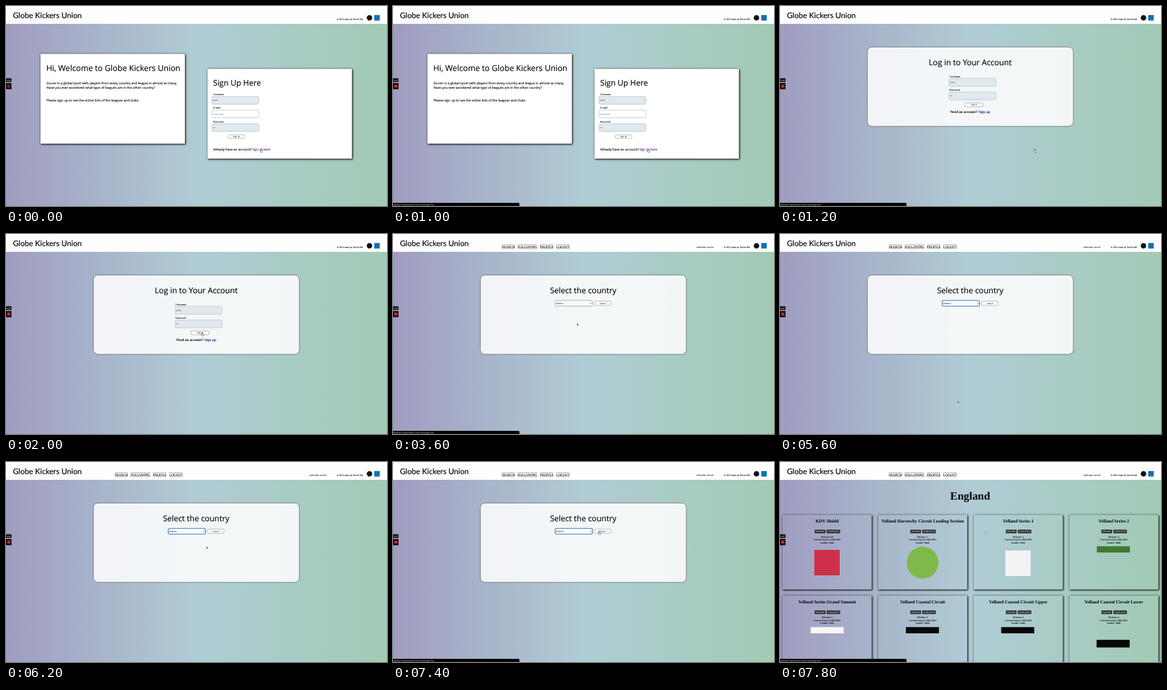
An HTML page for the animation above (8000 ms loop, 600 by 314 pixels).

```html
<!DOCTYPE html>
<html lang="en">
<head>
<meta charset="utf-8">
<title>Globe Kickers Union</title>
<style>
  html, body { margin: 0; width: 100%; height: 100%; overflow: hidden; background: #b0ccd5; }
  svg { display: block; width: 100vw; height: 100vh; }
  text { text-rendering: geometricPrecision; white-space: pre; fill: #000; }
  .head { font-family: "Open Sans", "Noto Sans", sans-serif; stroke: currentColor; stroke-width: .12px; }
  .logo { font-family: Lato, sans-serif; stroke: #000; stroke-width: .15px; }
  .hand { font-family: Lato, sans-serif; font-style: italic; }
  .serif { font-family: "Liberation Serif", serif; stroke: #000; stroke-width: .08px; }
  .bold { font-family: "Liberation Serif", serif; font-weight: 700; }
  .ui { font-family: "Liberation Sans", sans-serif; }
  .shadow { filter: drop-shadow(1.2px 1.4px 1.2px rgba(0, 0, 0, .85)) drop-shadow(.6px .8px 1.8px rgba(0, 0, 0, .5)); }
</style>
</head>
<body>
<svg id="stage" viewBox="0 0 600 314">
  <defs>
    <linearGradient id="bg" gradientUnits="userSpaceOnUse" x1="0" y1="0" x2="600" y2="0">
      <stop offset="0" stop-color="#a09dc0"/>
      <stop offset=".5" stop-color="#b0ccd5"/>
      <stop offset="1" stop-color="#a1cab4"/>
    </linearGradient>
  </defs>
</svg>
<script>
const LOOP = 8000, STEP = 200, ROW = 5.162;
const stage = document.getElementById("stage");

function add(parent, tag, attrs = {}) {
  const node = document.createElementNS("http://www.w3.org/2000/svg", tag);
  for (const key in attrs) node.setAttribute(key, attrs[key]);
  parent.append(node);
  return node;
}
const group = (parent = stage) => add(parent, "g");
const rect = (g, x, y, width, height, fill, more) =>
  add(g, "rect", { x, y, width, height, fill, ...more });
const disc = (g, cx, cy, r, fill) => add(g, "circle", { cx, cy, r, fill });
function label(g, kind, size, x, y, words, color, anchor = "start") {
  const node = add(g, "text", { class: kind, "font-size": size, x, y, "text-anchor": anchor });
  if (color) node.style.fill = node.style.color = color;
  node.textContent = words;
  return node;
}
const show = (g, on) => g.setAttribute("display", on ? "inline" : "none");

function field(g, x, y, words, filled = true) {
  rect(g, x, y, 74, 12.2, filled ? "#e1e9ee" : "#fff", { rx: 2.6, stroke: "#9db2be", "stroke-width": .6 });
  label(g, "ui", 3.1, x + 2, y + 7.2, words, filled ? "#111" : "#666");
}
function button(g, x, y, w, h, words) {
  rect(g, x, y, w, h, "#fdfdfd", { rx: 1.6, stroke: "#8a8f92", "stroke-width": .6 });
  label(g, "ui", 3.1, x + w / 2, y + h / 2 + 1.1, words, "#000", "middle");
}
const panel = g => rect(g, 137.5, 64.3, 324.5, 124.7, "rgba(255,255,255,.85)",
  { rx: 7.5, stroke: "#747b80", "stroke-width": 1 });

// Page background and header
rect(stage, 0, 0, 600, 314, "url(#bg)");
rect(stage, 0, 0, 600, 28, "#fefeff");
label(stage, "logo", 12.1, 11, 19.4, "Globe Kickers Union");
label(stage, "serif", 3.65, 521, 22.2, "© 2021 made by Torvin Pell");
disc(stage, 572.4, 18.5, 4.3, "#111");
rect(stage, 580, 14.2, 8.6, 8.6, "#0a72b3");

const nav = group();
[["SEARCH", 171.3, 20.7], ["FOLLOWING", 196.2, 31], ["PROFILE", 231.5, 21], ["LOGOUT", 257, 21.3]]
  .forEach(([words, x, w]) => {
    label(nav, "serif", 5.25, x, 22, words);
    rect(nav, x, 16.7, w, .4, "#333");
    rect(nav, x, 22.8, w, .4, "#333");
  });
label(nav, "hand", 4.1, 478, 22.2, "welcome, torvin");

// Sign up page
const signup = group();
rect(signup, 54.3, 75.2, 227.5, 141, "#fff", { class: "shadow" });
rect(signup, 317.3, 98.7, 227.5, 141, "#fff", { class: "shadow" });
label(signup, "head", 12.7, 63.4, 101.6, "Hi, Welcome to Globe Kickers Union");
[["Soccer is a global sport with players from every country and league in almost as many.", 123.2],
 ["Have you ever wondered what type of leagues are in the other country?", 129.6],
 ["Please sign up to see the entire lists of the leagues and clubs.", 149.6]]
  .forEach(([words, y]) => label(signup, "head", 5.15, 63.8, y, words));
label(signup, "head", 12.4, 326.2, 125.3, "Sign Up Here");
[["Username", 139.8, "torvin"], ["E-mail", 161.2, "Enter Email"], ["Password", 182.6, "•••"]]
  .forEach(([name, y, value], i) => {
    label(signup, "bold", 3.95, 326.2, y, name);
    field(signup, 324.2, y + 2.2, value, i !== 1);
  });
button(signup, 350.2, 202.2, 25.8, 5.6, "Sign up");
label(signup, "head", 5.15, 326.2, 226.8, "Already have an account?");
label(signup, "head", 5.15, 388, 226.8, "Sign in here", "#551a8b");

// Log in page
const login = group();
panel(login);
label(login, "head", 12.5, 299.6, 93, "Log in to Your Account", "", "middle");
[["Username", 111.6, "torvin"], ["Password", 133, "•••"]].forEach(([name, y, value]) => {
  label(login, "bold", 3.9, 267, y, name);
  field(login, 266.2, y + 2.1, value);
});
button(login, 291.2, 152.2, 28.4, 6, "Sign in");
label(login, "bold", 5.7, 268, 168.2, "Need an account?");
label(login, "bold", 5.7, 331, 168.2, "Sign up", "#2a1a8c", "end");

// Country page
const search = group();
panel(search);
label(search, "head", 12.5, 299.5, 93, "Select the country", "", "middle");
const box = rect(search, 255.4, 104.2, 58.8, 9, "#f8fafb", { rx: 2.4 });
const choice = label(search, "ui", 3.1, 257, 109.8, "");
add(search, "path", { d: "M310.9 108.2l1.2 1.3 1.2-1.3", fill: "none", stroke: "#333", "stroke-width": .6 });
button(search, 317.6, 105.4, 25.8, 6.6, "Search");

// Open list of countries
const menu = group();
rect(menu, 253.6, 99.4, 59.3, 214, "rgba(50,57,60,.8)", { rx: 1.2, stroke: "#555b5f", "stroke-width": .4 });
const mark = rect(menu, 253.6, 0, 59.3, 5.6, "#1268d8");
const rows = ("A,Andorra,Albania,Armenia,Argentina,Austria,Australia,Azerbaijan,Algeria," +
  "B,Belgium,Bulgaria,Bahrain,Bolivia,Brazil,Belarus," +
  "C,Canada,Chile,China,Colombia,Costa Rica,Cambodia,Cyprus,Czech Republic,Croatia," +
  "D,Denmark,E,Ecuador,Estonia,Egypt,England,El Salvador Rica," +
  "F,Finland,Faroe Islands,France,G,Germany").split(",");
const rowY = i => 103.7 + i * ROW;
rows.forEach((name, i) => {
  const letter = name.length === 1;
  label(menu, "ui", 3.2, letter ? 259 : 262.8, rowY(i) + 1.1, name, letter ? "#999fa2" : "#f4f4f4");
});
add(menu, "path", { d: "M281.4 309.4h3l-1.5 1.8z", fill: "#eee" });

// Results page
const results = group();
label(results, "bold", 17.4, 299.5, 58.6, "England", "", "middle");
const leagues = [
  ["KDV Shield", 99], ["Velland Harrowby Circuit Leading Section", 7],
  ["Velland Series 1", 3], ["Velland Series 2", 4],
  ["Velland Series Grand Summit", 2], ["Velland Coastal Circuit", 5],
  ["Velland Coastal Circuit Upper", 6], ["Velland Coastal Circuit Lower", 6]
];
leagues.forEach(([name, division], i) => {
  const x = 4 + (i % 4) * 150.5, y = 83 + (i > 3) * 126.7, mid = x + 70.2;
  rect(results, x, y, 140.4, 117.2, "url(#bg)", { class: "shadow" });
  label(results, "bold", 7.1, mid, y + 12, name, "", "middle");
  [["FOLLOW", -19.6, 17], ["CLUB LISTS", -.8, 21.4]].forEach(([words, dx, w]) => {
    rect(results, mid + dx, y + 23.2, w, 5.8, "#333", { rx: 1 });
    label(results, "ui", 3, mid + dx + w / 2, y + 27.2, words, "#fff", "middle");
  });
  [`Division: ${division}`, "Current Season: 2020-2021", "Gender: Male"].forEach((words, n) =>
    label(results, "bold", 3.7, mid, y + 35.7 + n * 4.4, words, "", "middle"));
});
rect(results, 54, 138, 40, 40, "#cf3049");
disc(results, 224.6, 158, 25, "#7fb949");
rect(results, 354.8, 139, 40, 40, "#f3f3f6");
rect(results, 499, 132.3, 52, 9.8, "#3f7a35");
rect(results, 48.3, 259.2, 52, 9.8, "#f8f6f6");
rect(results, 198.3, 259.2, 52, 9.8, "#080808");
rect(results, 348.4, 259.2, 52, 9.8, "#080808");
rect(results, 498.6, 279.2, 52, 12, "#080808");

// Browser status line, recorder and window corners
const status = group();
add(status, "path", { d: "M0 309h197.5q1.7 0 1.7 1.7V314H0z", fill: "#050505" });
label(status, "ui", 3.05, .6, 312.6, "Waiting for globe-kickers-union.herokuapp.com...", "#eee");
rect(stage, 0, 113.5, 8.6, 5.8, "#0b0b0b");
const clock = label(stage, "ui", 3.3, 4.2, 117.6, "", "#fff", "middle");
rect(stage, 0, 121, 8.6, 9.6, "#0b0b0b");
const record = rect(stage, 2, 123.5, 4.5, 4.5, "", { rx: .8 });
add(stage, "path", { d: "M0 314v-1.6q0 1.6 1.6 1.6zM600 314v-1.6q0 1.6-1.6 1.6z", fill: "#111" });

// Pointers, each with its tip at 0,0
const pointer = group();
const shapes = {
  arrow: add(pointer, "path", { d: "M0 0v3.5l.8-.7.6 1.3.6-.3-.6-1.2h1.1z",
    fill: "#000", stroke: "#fff", "stroke-width": .3 }),
  hand: add(pointer, "path", { d: "M-.5-2.6q.5-.5.9 0v2l1.8.6q.4.2.3.8l-.4 1.9h-2.5l-1.5-2q0-.6.6-.5l.8.6z",
    fill: "#fff", stroke: "#111", "stroke-width": .5 }),
  ring: add(pointer, "circle", { r: 1.5, fill: "#d6e4ea", stroke: "#5d7f92", "stroke-width": .6 })
};

// time, x, y, pointer used from that time on
const path = [
  [0, 401.6, 227, "hand"], [1400, 401.6, 227, "arrow"],
  [2000, 309, 157, "hand"], [3200, 309, 157, "hand"], [3400, 300, 149, "arrow"],
  [3600, 289.8, 140.2, "arrow"], [3800, 289.8, 140.2, "arrow"], [4200, 280, 109, "arrow"],
  [5600, 280, 262, "arrow"], [6200, 315.8, 132.6, "arrow"], [6400, 315.8, 132.6, "arrow"],
  [6800, 324.6, 111, "hand"], [7600, 324.6, 111, "ring"], [8000, 324.6, 111, "ring"]
];

function draw(t) {
  const within = (from, to) => t >= from && t < to;
  const open = within(4200, 5600), picked = t >= 5600;
  show(signup, t < 1200);
  show(login, within(1200, 3400));
  show(search, within(3400, 7600));
  show(results, t >= 7600);
  show(nav, t >= 3400);
  show(menu, open);
  show(status, within(400, 1400) || within(3000, 3800) || t >= 6800);

  choice.textContent = picked ? "England" : "Andorra";
  box.setAttribute("stroke", picked ? "#3674bd" : "#858b90");
  box.setAttribute("stroke-width", picked ? 1.1 : .7);
  const run = Math.min(1, Math.max(0, (t - 4400) / 800));
  let row = Math.round(1 + 31 * run);
  if (rows[row].length === 1) row++;
  mark.setAttribute("y", rowY(row) - 2.8);

  clock.textContent = "0:0" + Math.floor(t / 1000);
  record.setAttribute("fill", t < 200 ? "#8d1b1e" : "#f0212a");

  const k = path.findIndex((p, i) => i + 1 === path.length - 1 || t < path[i + 1][0]);
  const [t0, x0, y0, kind] = path[k], [t1, x1, y1] = path[k + 1];
  const f = (t - t0) / (t1 - t0);
  pointer.setAttribute("transform", `translate(${x0 + (x1 - x0) * f} ${y0 + (y1 - y0) * f})`);
  for (const name in shapes) show(shapes[name], name === kind);
  show(pointer, !open);
}

const start = performance.now();
function tick() {
  const t = (performance.now() - start) % LOOP;
  draw(Math.floor(t / STEP) * STEP);
  requestAnimationFrame(tick);
}
tick();
</script>
</body>
</html>
```
